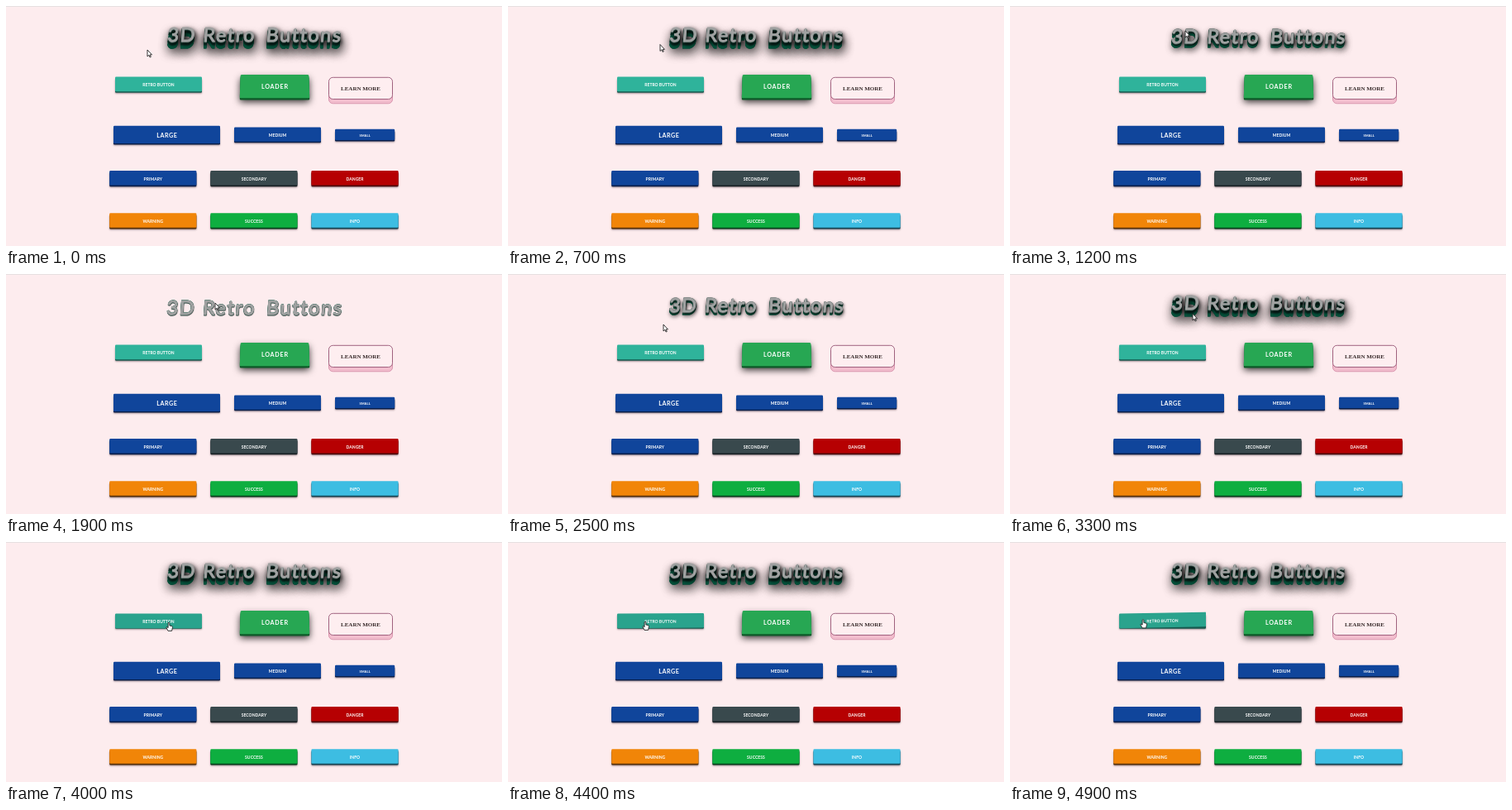
An HTML page with a canvas that plays this animation: 600 px wide and 290 px high, repeating every 5 s.

```html
<!DOCTYPE html>
<html lang="en">
<head>
<meta charset="utf-8">
<title>3D Retro Buttons</title>
<style>
  html, body { margin: 0; width: 100%; height: 100%; overflow: hidden; background: #fdecee; }
  canvas { display: block; }
</style>
</head>
<body>
<canvas id="stage" width="600" height="290"></canvas>
<script>
const ctx = document.getElementById('stage').getContext('2d');
const LOOP = 5000, STEP = 100;

// Pointer way-points: time, x, y
const route = [
  [0, 171, 53], [500, 172, 52], [900, 196, 41], [1200, 212, 30], [1600, 236, 32],
  [1900, 253, 35], [2200, 218, 50], [2500, 188, 61], [2900, 200, 58], [3300, 221, 48],
  [3650, 207, 86], [4000, 197, 97], [4400, 166, 96], [4800, 149, 95], [4900, 161, 93.5]
];
const arrow = new Path2D('M0 0V8L1.9 6.3L3.1 9L4.3 8.5L3.1 5.9H5.5Z');
const hand = new Path2D('M-.9 .8Q0-.6 .9 .8V4L3.9 4.7Q4.6 5 4.4 6.6L3.6 10.4H-1L-3 6.6Q-3.2 5.3-2 5.7L-.9 6.7Z');

const clamp = v => Math.min(1, Math.max(0, v));
const ramp = (t, start, length) => {
  const u = clamp((t - start) / length);
  return 1 - (1 - u) ** 2 * (1 + u * .9) * (1 - u * .4);
};

function pointerAt(t) {
  const i = route.findIndex(p => p[0] > t);
  if (i < 0) return route[route.length - 1].slice(1);
  const [t0, x0, y0] = route[i - 1], [t1, x1, y1] = route[i];
  const k = (t - t0) / (t1 - t0);
  return [x0 + (x1 - x0) * k, y0 + (y1 - y0) * k];
}

function shadow(color, blur, x, y) {
  ctx.shadowColor = color;
  ctx.shadowBlur = blur;
  ctx.shadowOffsetX = x;
  ctx.shadowOffsetY = y;
}
const noShadow = () => shadow('transparent', 0, 0, 0);

function box(x, y, w, h, r, fill) {
  ctx.beginPath();
  ctx.roundRect(x, y, w, h, r);
  ctx.fillStyle = fill;
  ctx.fill();
}

function label(str, x, y, size, track = 0, color = '#fff', font = 'Lato, "Open Sans", sans-serif') {
  ctx.font = `bold ${size}px ${font}`;
  ctx.letterSpacing = track + 'px';
  ctx.textAlign = 'center';
  ctx.textBaseline = 'alphabetic';
  ctx.fillStyle = color;
  ctx.fillText(str, x + track / 2, y + size * .36);
}

function button(str, x, y, w, h, face, base, size = 5, track = .05, press = 0, tilt = 0) {
  shadow('rgba(40,20,30,.45)', 2, 0, 1);
  box(x, y + 2, w, h - 2, 1.2, base);
  noShadow();
  ctx.save();
  ctx.translate(x + w / 2, y + press);
  ctx.transform(1, -.019 * tilt, 0, 1, 0, 0);
  box(-w / 2, 0, w, h - 1.6, 1.2, face);
  label(str, 0, h / 2 + .1, size, track);
  ctx.restore();
}

function words(dy, color) {
  ctx.fillStyle = ctx.strokeStyle = color;
  for (const [str, x] of [['3D', 194], ['Retro', 237.5], ['Buttons', 314.5]]) {
    ctx.strokeText(str, x, dy);
    ctx.fillText(str, x, dy);
  }
}

function title(depth) {
  const y = 48.5 - 6 * depth, deep = 8 * depth;
  ctx.save();
  ctx.translate(299.5, y);
  ctx.transform(1 - .01 * depth, 0, -.07, 1, 0, 0);
  ctx.translate(-299.5, 0);
  ctx.font = '400 23.5px Lato, "Open Sans", sans-serif';
  ctx.letterSpacing = '1.6px';
  ctx.textAlign = 'left';
  ctx.textBaseline = 'alphabetic';
  ctx.lineJoin = 'round';
  ctx.lineWidth = 1.1;
  shadow(`rgba(0,0,0,${.9 * depth})`, 13 * depth, 1.5 * depth, 4 * depth);
  words(deep, '#075a42');
  words(deep * .5, '#075a42');
  noShadow();
  for (let d = deep; d > 0; d--) words(d, d > deep * .6 ? '#07553e' : '#0a3329');
  shadow(`rgba(0,0,0,${.4 + .6 * depth})`, 1 + 4 * depth, .5 + depth, .5 + 2 * depth);
  words(1, '#3f5c54');
  noShadow();
  words(0, '#a1a2a2');
  ctx.restore();
}

function loader() {
  const slab = (top, bottom, color) => {
    ctx.beginPath();
    ctx.moveTo(285, top);
    ctx.lineTo(365, top);
    ctx.quadraticCurveTo(366.4, top, 366.5, top + 2);
    ctx.lineTo(367.2, bottom - 1);
    ctx.quadraticCurveTo(367, bottom, 366, bottom);
    ctx.lineTo(284, bottom);
    ctx.quadraticCurveTo(282.8, bottom, 282.8, bottom - 1);
    ctx.lineTo(283.5, top + 2);
    ctx.quadraticCurveTo(283.6, top, 285, top);
    ctx.fillStyle = color;
    ctx.fill();
  };
  shadow('rgba(0,0,0,.8)', 8, 0, 2.5);
  slab(85, 113.5, '#0d5a28');
  noShadow();
  slab(83, 111.3, '#27a753');
  label('LOADER', 325, 97.4, 7.2, .75);
}

function learnMore() {
  ctx.lineWidth = 1;
  box(390.5, 91.5, 77, 26.3, 5, '#f2bdcd');
  ctx.strokeStyle = '#d993ad';
  ctx.stroke();
  box(390.5, 86.3, 77, 26.2, 5, '#feeef0');
  ctx.strokeStyle = '#a0627f';
  ctx.stroke();
  label('LEARN MORE', 429, 99.5, 7, 0, '#382b2b', '"Liberation Serif", serif');
}

function pointer(x, y, pointing) {
  ctx.save();
  ctx.translate(x, y);
  const shape = pointing ? hand : arrow;
  ctx.lineWidth = .9;
  ctx.lineJoin = 'round';
  ctx.fillStyle = '#fff';
  ctx.strokeStyle = '#222';
  ctx.fill(shape);
  ctx.stroke(shape);
  ctx.restore();
}

function draw(t) {
  ctx.fillStyle = '#fdecee';
  ctx.fillRect(0, 0, 600, 290);
  ctx.fillStyle = '#e6e0e1';
  ctx.fillRect(0, 0, 600, 1);

  title(1 - ramp(t, 1000, 900) + ramp(t, 2270, 900));

  const over = t >= 3650;
  const tilt = ramp(t, 4350, 250);
  const press = ramp(t, 3600, 200) * (1 - tilt);
  button('RETRO BUTTON', 132, 85.6, 105, 19.2, over ? '#2aa38d' : '#2fb39b', '#17594f', 5, 0, press, tilt);
  loader();
  learnMore();

  const blue = '#10459b', navy = '#081f4c';
  button('LARGE', 130, 144.7, 129, 22.8, blue, navy, 7.2, .5);
  button('MEDIUM', 276, 146.5, 105, 18.8, blue, navy);
  button('SMALL', 398, 148.7, 72.2, 14.8, blue, navy, 4.1);

  const rows = [
    [199, ['PRIMARY', blue, navy], ['SECONDARY', '#39494d', '#182124'], ['DANGER', '#b60002', '#4c0205']],
    [250.2, ['WARNING', '#f18508', '#583008'], ['SUCCESS', '#0eae40', '#073f1b'], ['INFO', '#3dbde2', '#154554']]
  ];
  for (const [y, ...items] of rows)
    items.forEach(([str, face, base], i) => button(str, 125.2 + 122.1 * i, y, 105.2, 19.2, face, base));

  pointer(...pointerAt(t), over);
}

function tick() {
  draw(Math.floor(performance.now() % LOOP / STEP) * STEP);
  requestAnimationFrame(tick);
}
tick();
</script>
</body>
</html>
```
